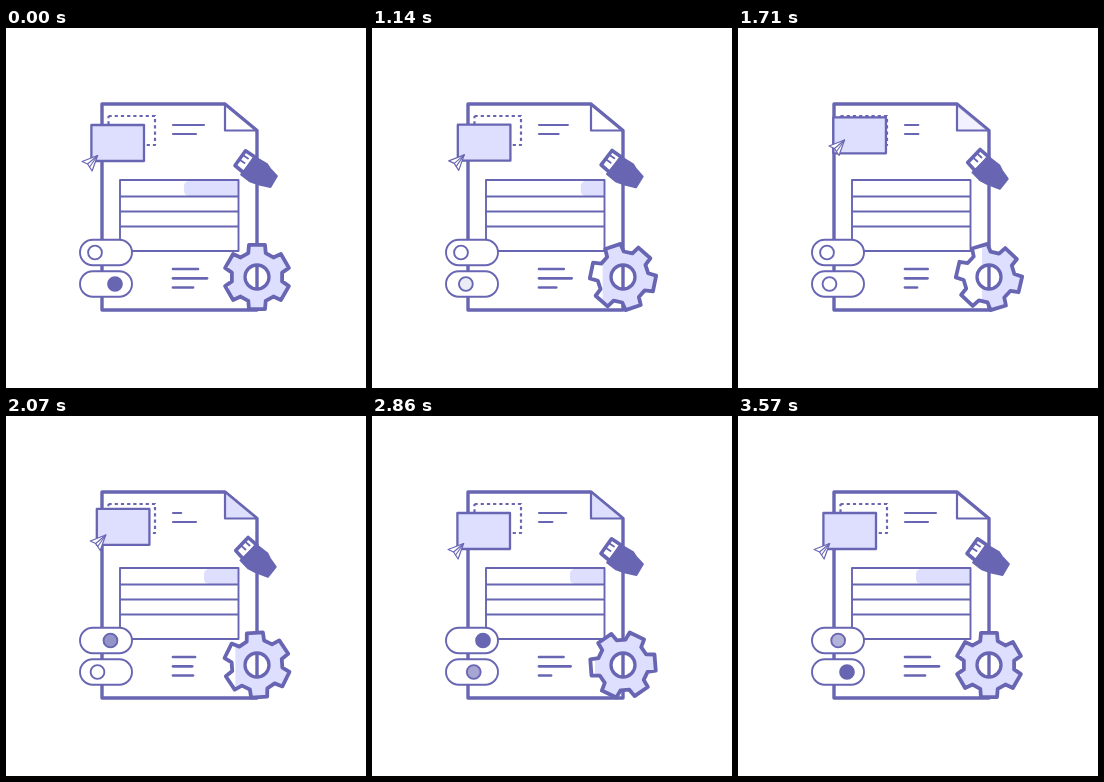
An HTML page with a canvas for the animation above (3640 ms loop, 360 by 360 pixels).

```html
<!DOCTYPE html>
<html lang="en">
<head>
<meta charset="utf-8">
<title>Document tools</title>
<style>
  html, body { margin: 0; width: 100%; height: 100%; overflow: hidden; background: #fff; }
  canvas { display: block; width: 360px; height: 360px; }
</style>
</head>
<body>
<canvas id="stage"></canvas>
<script>
const LOOP = 3640, HOLD = 860, STEP = 71.28, LAST = HOLD + 38 * STEP;
const DARK = '#6866b2', LIGHT = '#dedeff', WHITE = '#fff';
const TURN = Math.PI * 2;

const canvas = document.getElementById('stage');
const ctx = canvas.getContext('2d');
const ratio = Math.max(1, window.devicePixelRatio || 1);
canvas.width = canvas.height = 360 * ratio;

// Progress of t from a to b, clamped to 0..1.
const part = (t, a, b) => Math.min(1, Math.max(0, (t - a) / (b - a)));

function ease(t, a, b) {
  const p = part(t, a, b);
  return p * p * (3 - 2 * p);
}

// Rises from a to b, falls back from c to d.
const pulse = (t, a, b, c, d) => ease(t, a, b) - ease(t, c, d);

function poly(points, closed = true) {
  const p = new Path2D();
  points.forEach(([x, y], i) => i ? p.lineTo(x, y) : p.moveTo(x, y));
  if (closed) p.closePath();
  return p;
}

function box(x, y, w, h, r = 0) {
  const p = new Path2D();
  p.roundRect(x, y, w, h, r);
  return p;
}

function disc(x, y, r) {
  const p = new Path2D();
  p.arc(x, y, r, 0, TURN);
  return p;
}

function paint(path, fill, width) {
  if (fill) { ctx.fillStyle = fill; ctx.fill(path, 'evenodd'); }
  if (width) { ctx.lineWidth = width; ctx.stroke(path); }
}

function line(x1, y1, x2, y2, width) {
  paint(poly([[x1, y1], [x2, y2]], false), null, width);
}

function page(t) {
  paint(poly([[96, 76], [219, 76], [251, 102.5], [251, 282], [96, 282]]), WHITE, 3.4);
  const flap = poly([[219, 76], [219, 102.5], [251, 102.5]]);
  ctx.globalAlpha = pulse(t, 1400, 1950, 2950, 3400);
  paint(flap, LIGHT);
  ctx.globalAlpha = 1;
  paint(flap, null, 2.2);
}

function textLines(t) {
  const slow = pulse(t, HOLD, 2000, 2000, 3150);
  const quick = (1 - Math.cos(2 * TURN * part(t, HOLD, 3280))) / 2;
  line(167, 97, 198 - 23 * slow, 97, 2.1);
  line(167, 106, 190 - 12 * quick, 106, 2.1);
  line(167, 241, 192 - 3 * slow, 241, 2.7);
  line(167, 250.3, 201 - 15 * slow, 250.3, 2.7);
  line(167, 259.5, 187 - 10 * quick, 259.5, 2.7);
}

function table(t) {
  const left = 178 + 54 * ease(t, 740, 1350) - 34 * ease(t, 1800, 2000) - 20 * ease(t, 2900, 3400);
  if (left < 231) paint(box(left, 153, 232 - left, 15, [5, 0, 0, 5]), LIGHT);
  paint(box(114, 152, 118.5, 71), null, 1.9);
  for (const y of [168.5, 183.5, 198.5]) line(114, y, 232, y, 1.9);
}

function card(t) {
  const go = pulse(t, 1000, 1600, 1600, 2600);

  ctx.setLineDash([3.2, 3]);
  ctx.lineCap = 'butt';
  paint(box(102.5, 88, 46.5, 29), null, 2.2);
  ctx.setLineDash([]);
  ctx.lineCap = 'round';
  paint(box(85.4 + 10 * go, 97 - 7.7 * go, 52.6, 36), LIGHT, 2.3);

  ctx.save();
  ctx.translate(15 * go - .4, -15.6 * go);
  paint(poly([[92, 127.5], [76.5, 133.5], [82, 136], [86.5, 143]]), WHITE, 1.2);
  line(92, 127.5, 82, 136, 1.1);
  line(92, 127.5, 84, 139, 1.1);
  ctx.restore();
}

function toggle(y, on, offX, onX) {
  paint(box(74, y - 12.7, 52, 25.4, 12.7), WHITE, 1.9);
  const knob = disc(offX + (onX - offX) * on, y, 6.9);
  ctx.globalAlpha = on;
  paint(knob, DARK);
  ctx.globalAlpha = 1;
  paint(knob, null, 1.9);
}

function brush(t) {
  const angle = 8 * pulse(t, 900, 1500, 2070, 2700);
  ctx.save();
  ctx.translate(250, 141);
  ctx.rotate(angle / 360 * TURN);
  ctx.translate(-250, -141);
  paint(poly([[229, 137.5], [239.5, 122.8], [249, 129], [238, 145]]), WHITE, 3.6);
  line(234, 132, 238.5, 135, 1.9);
  line(237.5, 127.5, 242, 130.5, 1.9);
  paint(poly([[249, 129], [261, 136], [264, 140.5], [271, 148], [264.5, 159],
    [251, 156], [244, 153.5], [235, 146.5]]), DARK, 1.8);
  ctx.restore();
}

function gearBody(turn) {
  const points = [];
  for (let i = 0; i < 6; i++) {
    for (const [side, r] of [[-20, 25.5], [-14, 33.2], [14, 33.2], [20, 25.5]]) {
      const a = (i * 60 + side + turn) / 360 * TURN;
      points.push([r * Math.sin(a), -r * Math.cos(a)]);
    }
  }
  return poly(points);
}

function gear(t) {
  // Turns back by five teeth, gathering a little speed.
  const body = gearBody(-300 * part(t, HOLD, LAST) ** 1.1);
  const hole = disc(0, 0, 12);
  const ring = new Path2D(body);
  ring.addPath(hole);

  ctx.save();
  ctx.translate(251, 249);
  paint(ring, LIGHT);
  ctx.save();
  ctx.clip(ring, 'evenodd');
  const glare = 8 + 24 * pulse(t, HOLD, 1430, 1430, 2400);
  paint(box(-36, -36, glare, 72), WHITE);
  ctx.restore();
  paint(body, null, 3.8);
  paint(hole, null, 3.3);
  ctx.restore();
}

function draw(t) {
  ctx.setTransform(ratio, 0, 0, ratio, 0, 0);
  ctx.fillStyle = WHITE;
  ctx.fillRect(0, 0, 360, 360);
  ctx.strokeStyle = DARK;
  ctx.lineCap = ctx.lineJoin = 'round';
  page(t);
  textLines(t);
  table(t);
  card(t);
  toggle(224.5, pulse(t, 1880, 2180, 3420, 3720), 89, 111);
  toggle(256, 1 - pulse(t, 820, 1150, 2700, 2980), 91.5, 109);
  brush(t);
  gear(t);
}

// The first pose is held, then the picture advances in even steps.
function poseTime(t) {
  return t < HOLD ? 0 : HOLD + Math.floor((t - HOLD) / STEP + .05) * STEP;
}

const start = performance.now();
function tick() {
  draw(poseTime((performance.now() - start) % LOOP));
  requestAnimationFrame(tick);
}
tick();
</script>
</body>
</html>
```
